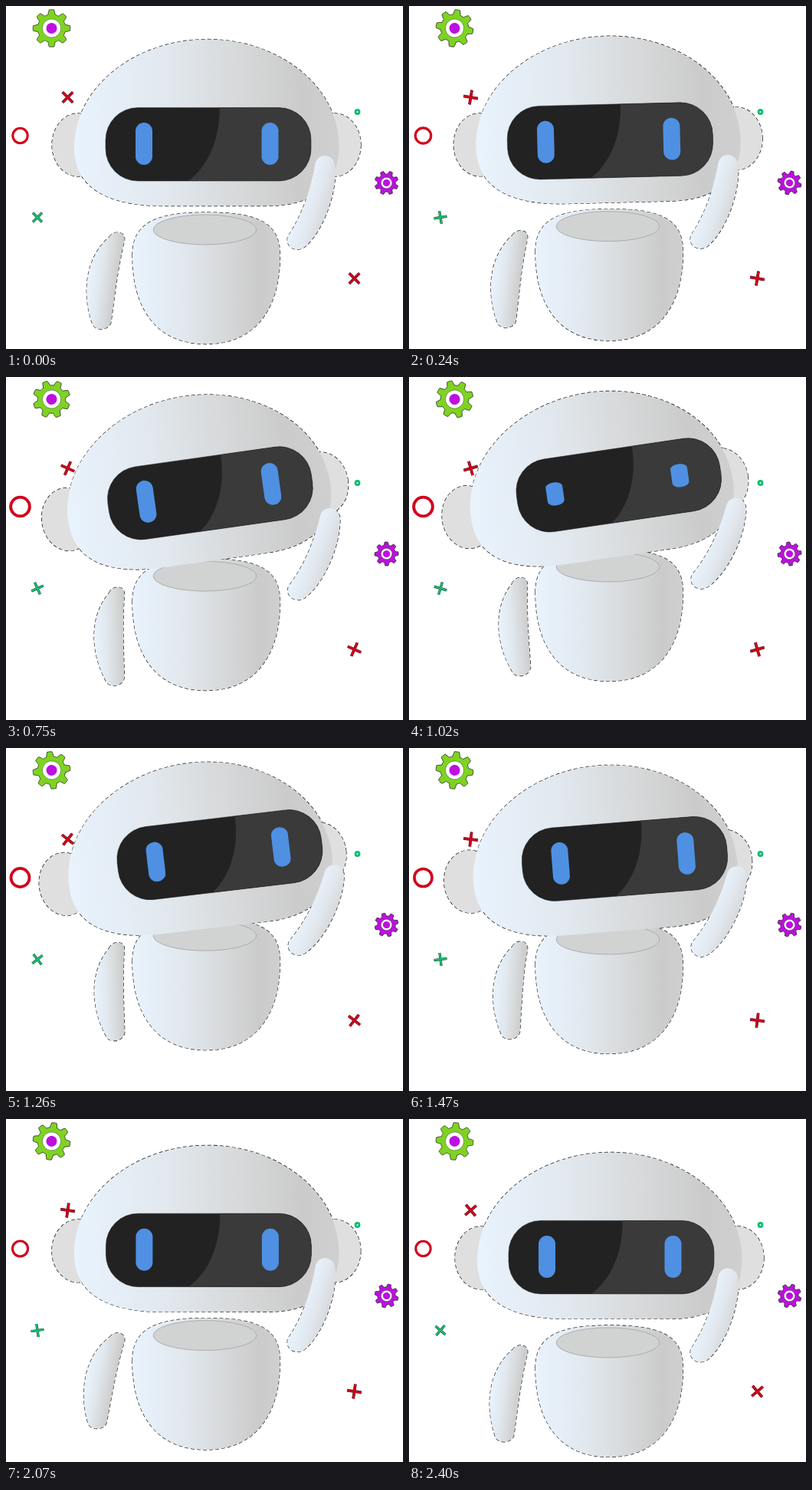
Write an HTML page with a canvas that moves like this. It is 518 by 447 pixels and loops after 2.43 s.

```html
<!DOCTYPE html>
<html lang="en">
<head>
<meta charset="utf-8">
<title>Floating robot</title>
<style>
  html, body { margin: 0; width: 100%; height: 100%; overflow: hidden; background: #fff; }
  canvas { display: block; }
</style>
</head>
<body>
<canvas id="stage" width="518" height="447"></canvas>
<script>
const ctx = document.getElementById('stage').getContext('2d');
const LOOP = 2430, STEP = 30, TAU = Math.PI * 2, DEG = Math.PI / 180;
const RED = '#d0021b', GREEN = '#12bd70', LIME = '#7ed321', PURPLE = '#bd10e0', EDGE = '#222';

const shapes = {
  head: new Path2D('M89 185C89 105 170 43.5 263 43.5C356 43.5 434.5 105 434.5 183C434.5 235 400 260.5 340 260.5L205 260.5C130 260.5 89 235 89 185Z'),
  body: new Path2D('M165 325C165 283 195 269 262 269C330 269 357.5 283 357.5 325C357.5 395 325 440.5 261 440.5C197 440.5 165 395 165 325Z'),
  leftArm: new Path2D('M135 301C140 292 157 293 154.5 306C146 340 142 375 137 412C134 424 114 424 112 412C98 370 106 325 135 301Z'),
  rightArm: new Path2D('M403.5 206C406 191 428 191 429.5 209C432 245 413 294 391 313C380 323 363 314 368 300C388 270 397 240 403.5 206Z'),
  glare: new Path2D('M278.5 130C280 170 265 210 235 230L400 230L400 130Z')
};

function gradient(x0, y0, x1, y1, stops) {
  const g = ctx.createLinearGradient(x0, y0, x1, y1);
  stops.forEach(([at, color]) => g.addColorStop(at, color));
  return g;
}
const metal = [[0, '#e9f3fd'], [0.35, '#e1e8ee'], [0.62, '#d7d9da'], [0.86, '#cbcbcb'], [1, '#cfcfcf']];
const fills = {
  head: gradient(89, 0, 434, 0, metal),
  body: gradient(165, 0, 357, 0, metal),
  leftArm: gradient(108, 350, 152, 356, metal),
  rightArm: gradient(384, 250, 428, 264, [[0, '#e9f3fd'], [0.5, '#e1e7ed'], [1, '#d2d3d4']])
};

// Sinusoidal easing through [time, value] keys.
function track(t, keys) {
  for (let i = 1; i < keys.length; i++) {
    const [t0, a] = keys[i - 1], [t1, b] = keys[i];
    if (t <= t1) return a + (b - a) * (1 - Math.cos(Math.PI * (t - t0) / (t1 - t0))) / 2;
  }
  return keys[keys.length - 1][1];
}

function group(draw, dx, dy, angle = 0, px = 0, py = 0) {
  ctx.save();
  ctx.translate(px + dx, py + dy);
  ctx.rotate(angle);
  ctx.translate(-px, -py);
  draw();
  ctx.restore();
}

function fill(path, color) {
  ctx.fillStyle = color;
  ctx.fill(path);
}

function stroke(path, color, width) {
  ctx.strokeStyle = color;
  ctx.lineWidth = width;
  ctx.stroke(path);
}

function dashedEdge(path) {
  ctx.setLineDash([5, 3]);
  stroke(path, EDGE, 1.3);
  ctx.setLineDash([]);
}

function oval(x, y, rx, ry = rx) {
  const p = new Path2D();
  p.ellipse(x, y, rx, ry, 0, 0, TAU);
  return p;
}

function gear(x, y, r, color, spin, hole, hub) {
  group(() => {
    const p = new Path2D(), n = 96;
    for (let i = 0; i < n; i++) {
      const a = i / n * TAU;
      const tooth = Math.max(-1, Math.min(1, 2.4 * Math.cos(8 * a)));
      const d = r * (0.875 + 0.125 * tooth);
      p.lineTo(d * Math.sin(a), -d * Math.cos(a));
    }
    p.closePath();
    fill(p, color);
    stroke(p, EDGE, 0.7);
    fill(oval(0, 0, hole), '#fff');
    stroke(oval(0, 0, hole), EDGE, 0.4);
    fill(oval(0, 0, hub), PURPLE);
  }, x, y, spin);
}

function cross(x, y, half, width, color, spin) {
  group(() => {
    const p = new Path2D(`M${-half} ${-half}L${half} ${half}M${half} ${-half}L${-half} ${half}`);
    stroke(p, EDGE, width + 0.7);
    stroke(p, color, width);
  }, x, y, spin);
}

function ring(x, y, r, width, color) {
  stroke(oval(x, y, r - width / 2), color, width);
}

function decorations(t) {
  const spin = t / LOOP * TAU;
  gear(59.5, 29, 24.3, LIME, -spin, 12, 7);
  gear(496.5, 230.5, 15.5, PURPLE, spin + TAU / 16, 7.3, 4.6);
  cross(80.5, 119, 6.7, 3, RED, -spin);
  cross(454.5, 355, 6.7, 3, RED, -spin);
  cross(41, 275.5, 6, 2.5, GREEN, spin);
  const r = track(t, [[0, 11.2], [850, 14.4], [LOOP, 11.2]]);
  ring(18.5, 169, r, r * 0.27, RED);
  ring(458.5, 138, 3.9, 2.9, GREEN);
}

function face(look, openness) {
  const visor = new Path2D();
  visor.roundRect(130, 132.5, 268, 95.5, 42);
  fill(visor, '#222');
  ctx.save();
  ctx.clip(visor);
  group(() => {
    fill(shapes.glare, '#3a3a3a');
    ctx.fillRect(398, 130, 20, 100);
  }, 11 * look, 0);
  ctx.restore();
  stroke(visor, '#1c1a1c', 0.5);

  ctx.fillStyle = '#4f90e3';
  for (const x of [180, 344.5]) {
    ctx.save();
    ctx.translate(x, 179.5);
    ctx.scale(1, openness);
    ctx.beginPath();
    ctx.roundRect(-11, -27.5, 22, 55, 11);
    ctx.fill();
    ctx.restore();
  }
}

function robot(t, paint, details) {
  const phase = t / LOOP * TAU;
  const rise = -23.5 * (1 - Math.cos(phase));
  const look = track(t, [[0, 0], [190, 0], [1260, 1], [1380, 1], [2130, 0]]);
  const tilt = -DEG * track(t, [[0, 0], [900, 8.6], [2080, 0]]);
  const swing = DEG * track(t, [[0, 0], [1060, -11.6], [1900, 4], [LOOP, 0]]);
  const armLag = track(t, [[0, 0], [860, 11.5], [1920, -8.3], [LOOP, 0]]);
  const openness = track(t, [[0, 1], [930, 1], [1110, 0.1], [1290, 1]]);

  group(() => {
    paint(shapes.body, fills.body);
    if (!details) return;
    const opening = oval(259.5, 291.5, 67.3, 19.5);
    fill(opening, '#d1d2d2');
    stroke(opening, '#a6a8a9', 0.9);
  }, 0, rise);
  group(() => paint(shapes.leftArm, fills.leftArm), 0, rise + armLag, swing, 145, 305);
  group(() => {
    for (const x of [94, 429]) paint(oval(x - 9.7 * look, 181, 34, 41), '#dfdfdf');
    paint(shapes.head, fills.head);
    if (details) group(() => face(look, openness), 25 * look, -13.4 * look);
  }, 0, rise + 21.8 * look, tilt, 261.5, 251);
  group(() => paint(shapes.rightArm, fills.rightArm),
    look, rise + 5.5 * Math.sin(phase), 6.5 * DEG * look, 379, 306);
}

function draw(t) {
  ctx.fillStyle = '#fff';
  ctx.fillRect(0, 0, 518, 447);
  decorations(t);
  // Edges go below all fills, so they only show around the silhouette.
  robot(t, dashedEdge, false);
  robot(t, fill, true);
}

let start;
function tick() {
  const now = performance.now();
  start ??= now;
  draw(Math.floor((now - start) % LOOP / STEP) * STEP);
  requestAnimationFrame(tick);
}
tick();
</script>
</body>
</html>
```
